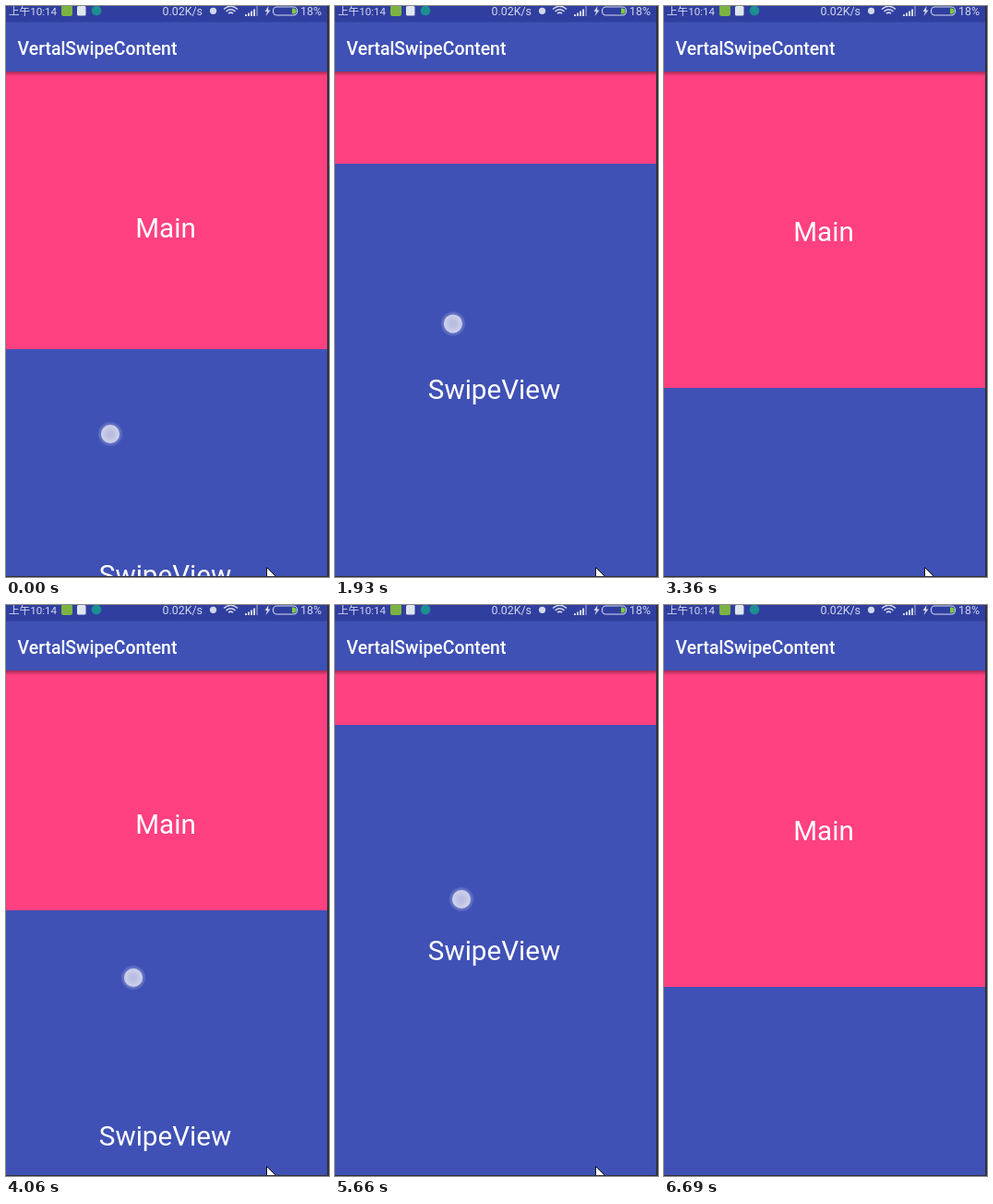
An HTML page for the animation above (6840 ms loop, 350 by 619 pixels).

```html
<!DOCTYPE html>
<html lang="en">
<head>
<meta charset="utf-8">
<title>Vertical swipe</title>
<style>
  html, body { margin: 0; width: 100%; height: 100%; overflow: hidden; background: #303F9F; }
  svg { display: block; font-family: Roboto, "Noto Sans CJK SC", "Noto Sans CJK", sans-serif; }
  .label { font-size: 29.6px; fill: #fff; text-anchor: middle; }
  .status { font-size: 12.4px; fill: #d3d7ec; }
</style>
</head>
<body>
<svg width="350" height="619" viewBox="0 0 350 619">
  <defs>
    <linearGradient id="shade" x2="0" y2="1">
      <stop stop-color="#000" stop-opacity=".35"/>
      <stop offset="1" stop-color="#000" stop-opacity="0"/>
    </linearGradient>
    <radialGradient id="dot">
      <stop offset=".3" stop-color="#b9bee1"/>
      <stop offset="1" stop-color="#d0d3eb"/>
    </radialGradient>
    <radialGradient id="glow">
      <stop offset=".7" stop-color="#fff" stop-opacity=".28"/>
      <stop offset="1" stop-color="#fff" stop-opacity=".05"/>
    </radialGradient>
  </defs>

  <rect y="71" width="350" height="548" fill="#FF4081"/>
  <text id="main" class="label" x="173">Main</text>
  <rect y="71" width="350" height="5" fill="url(#shade)"/>

  <g id="panel">
    <rect width="350" height="619" fill="#3F51B5"/>
    <text class="label" x="172.5" y="255.2">SwipeView</text>
  </g>

  <rect width="350" height="71" fill="#3F51B5"/>
  <rect width="350" height="17.5" fill="#303F9F"/>
  <text x="12.6" y="52.7" font-size="19.4" font-weight="500" fill="#fff">VertalSwipeContent</text>

  <g class="status">
    <text x="3" y="10.3" style="font-size:11.6px">上午10:14</text>
    <text x="169.5" y="10.3">0.02K/s</text>
    <text x="319" y="10.3">18%</text>
    <rect x="60" y="-1" width="12" height="12" rx="2.5" fill="#7cb342"/>
    <rect x="77" y="0" width="9.5" height="10.5" rx="1.5" fill="#dfe6ee"/>
    <circle cx="98" cy="5" r="5.3" fill="#1b8f91"/>
    <circle cx="224.5" cy="5.3" r="3.6"/>
    <g fill="none" stroke="#d3d7ec" stroke-width="1.5">
      <path d="M236 3.5Q243.5 -3 251 3.5M238.5 6Q243.5 1.5 248.5 6M241 8.3Q243.5 6 246 8.3"/>
      <path stroke-width="2" d="M260 11V9M263 11V7.5M266 11V5.5M269 11V3.5"/>
      <path stroke-width="2" opacity=".4" d="M272 11V0"/>
      <rect x="289.5" y="1" width="26" height="9" rx="4" stroke-width="1.1"/>
    </g>
    <path d="M284.5 0L280.5 6H283L281.5 11L286.5 4.5H284Z"/>
    <path d="M310 2.5h2q2.5 .5 2.5 3t-2.5 3h-2z" fill="#7ccb3f"/>
  </g>

  <g id="touch">
    <circle r="13.5" fill="url(#glow)"/>
    <circle r="10" fill="url(#dot)"/>
  </g>
  <path id="cursor" d="M282.5 608.5V625H299Z" fill="#fff" stroke="#111"/>
  <path d="M348 0h2V619H0v-1H348Z" fill="#30313a"/>
</svg>
<script>
  const LOOP = 6840;
  const STEP = 130;          // the screen refreshes in steps of this length
  const SETTLE_STEPS = 4;    // time the panel takes to snap after release
  const CURSOR_GONE = 6180;

  // Each swipe drags the panel edge over some steps, then lets it snap to rest.
  // x and gap place the finger: across, and below the edge, at both ends.
  const swipes = [
    { start: 0, steps: 7, edge: [372, 200], ease: 1, rest: 130, x: [113, 118], gap: [92, 87] },
    { start: 1790, steps: 8, edge: [133, 294], ease: 2, rest: 414, x: [128, 127], gap: [173, 176] },
    { start: 3900, steps: 5, edge: [398, 212], ease: 2, rest: 130, x: [138, 138], gap: [73, 73] },
    { start: 5650, steps: 3, edge: [130, 267], ease: 2, rest: 414, x: [137, 137], gap: [189, 189] }
  ];

  const [main, panel, touch, cursor] =
    ["main", "panel", "touch", "cursor"].map(id => document.getElementById(id));
  const mix = ([a, b], k) => a + (b - a) * k;
  const easeOut = (k, power) => 1 - (1 - Math.min(k, 1)) ** power;
  const show = (el, on) => el.setAttribute("visibility", on ? "visible" : "hidden");
  const move = (el, x, y) => el.setAttribute("transform", `translate(${x} ${y})`);

  function draw(now) {
    const time = now % LOOP;
    const swipe = swipes.findLast(s => s.start <= time);
    const step = Math.floor((time - swipe.start) / STEP);
    const dragged = step / swipe.steps;
    const touching = dragged <= 1;

    const edge = Math.round(touching
      ? mix(swipe.edge, easeOut(dragged, swipe.ease))
      : mix([swipe.edge[1], swipe.rest], easeOut((step - swipe.steps) / SETTLE_STEPS, 3)));

    move(panel, 0, edge);
    main.setAttribute("y", 251.2 + (edge - 372) * 0.085);
    move(touch, mix(swipe.x, dragged), edge + mix(swipe.gap, dragged));
    show(touch, touching);
    show(cursor, time < CURSOR_GONE);
  }

  const start = performance.now();
  (function loop() {
    draw(performance.now() - start);
    requestAnimationFrame(loop);
  })();
</script>
</body>
</html>
```
